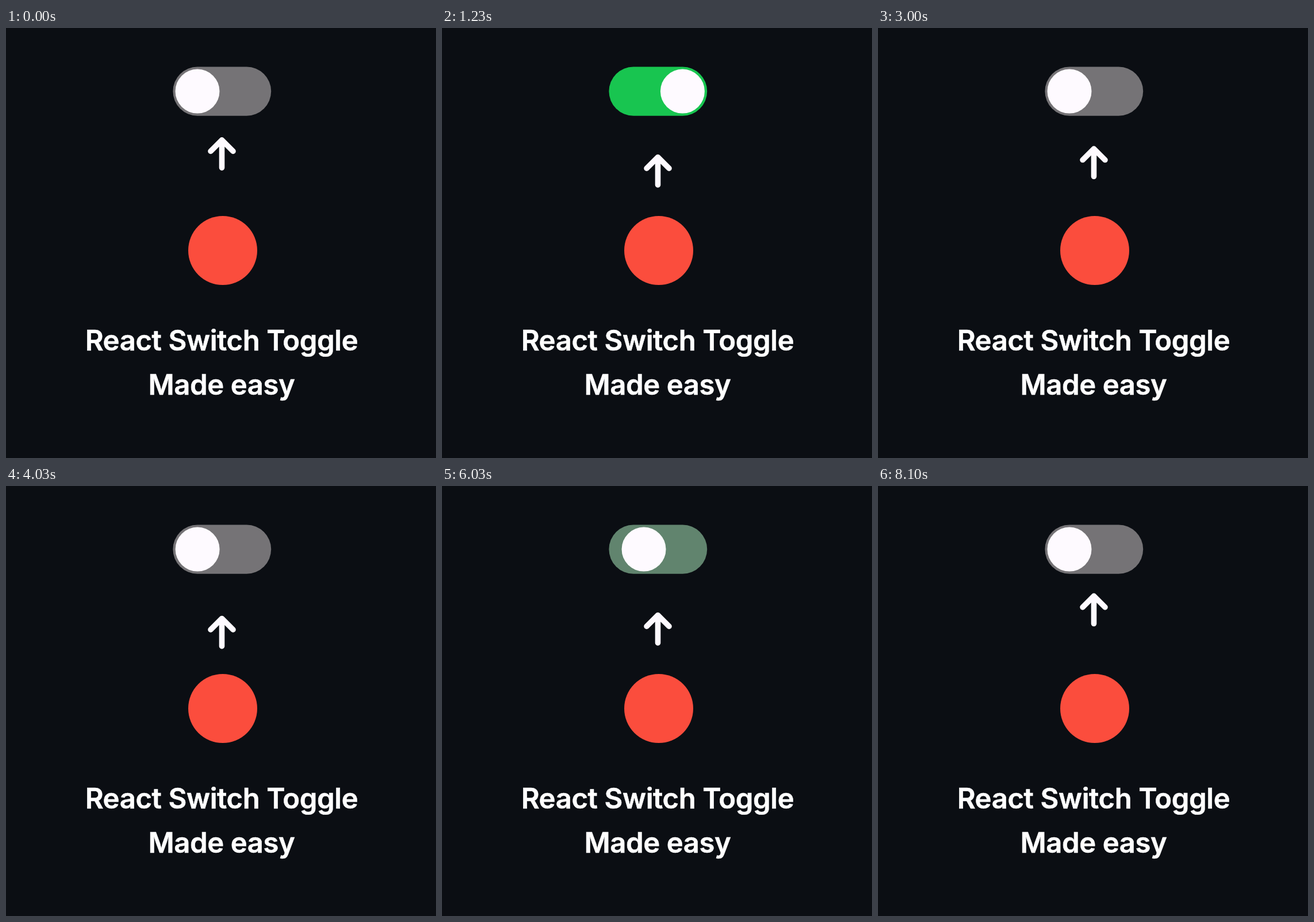
Write an HTML page that moves like this. It is 748 px wide and 748 px high and loops after 8120 ms.

```html
<!DOCTYPE html>
<html lang="en">
<head>
<meta charset="utf-8">
<title>Switch toggle</title>
<style>
  html, body { margin: 0; width: 100%; height: 100%; overflow: hidden; background: #0b0e13; }
  svg { display: block; width: 100vw; height: 100vh; }
  text {
    font: 600 49px Inter, "Open Sans", sans-serif;
    letter-spacing: -0.008em;
    fill: #fff;
    stroke: #fff;
    stroke-width: 0.6;
    text-anchor: middle;
  }
  #arrow { fill: none; stroke: #fefaff; stroke-width: 9.6; stroke-linecap: round; stroke-linejoin: round; }
</style>
</head>
<body>
<svg viewBox="0 0 748 748">
  <rect id="track" x="290.4" y="67.4" width="170.8" height="85.4" rx="42.7"/>
  <circle id="knob" cx="333" cy="110.1" r="38.5" fill="#fefaff"/>
  <path id="arrow" d="M375.5 53.2V5M356 24.5L375.5 5L395 24.5"/>
  <circle cx="377" cy="387" r="60" fill="#fb4d3d"/>
  <text x="375" y="561">React Switch Toggle</text>
  <text x="375" y="638">Made easy</text>
</svg>
<script>
  const LOOP = 8120;
  const BOUNCE = { period: 1600, topAt: 180, top: 185.5, height: 43 };
  const SLIDE = 300;
  const CLICKS = [900, 2150, 4030, 5885];
  const OFF = [117, 115, 118], ON = [24, 197, 80];

  const track = document.getElementById("track");
  const knob = document.getElementById("knob");
  const arrow = document.getElementById("arrow");

  // CSS-style cubic-bezier, solved by bisection
  function bezier(x1, y1, x2, y2) {
    const at = (a, b, s) => 3 * (1 - s) ** 2 * s * a + 3 * (1 - s) * s * s * b + s ** 3;
    return x => {
      if (x <= 0) return 0;
      if (x >= 1) return 1;
      let lo = 0, hi = 1;
      for (let i = 0; i < 24; i++) {
        const mid = (lo + hi) / 2;
        if (at(x1, x2, mid) < x) lo = mid; else hi = mid;
      }
      return at(y1, y2, lo);
    };
  }
  const ease = bezier(0.25, 0.1, 0.25, 1);
  const easeInOut = bezier(0.42, 0, 0.58, 1);

  function arrowTop(t) {
    const { period, topAt, top, height } = BOUNCE;
    const phase = ((t - topAt + period) % period) / period;
    return top + height * easeInOut(1 - Math.abs(1 - 2 * phase));
  }

  // 0 is off, 1 is on; clicks alternate between the two
  function switchState(t) {
    return CLICKS.reduce((v, at, i) => v + (i % 2 ? -1 : 1) * ease((t - at) / SLIDE), 0);
  }

  function draw(t) {
    const on = switchState(t);
    const rgb = OFF.map((c, i) => Math.round(c + (ON[i] - c) * on));
    track.setAttribute("fill", `rgb(${rgb})`);
    knob.setAttribute("cx", 333 + 85.4 * on);
    arrow.setAttribute("transform", `translate(0 ${arrowTop(t).toFixed(2)})`);
  }

  const start = performance.now();
  function tick() {
    draw((performance.now() - start) % LOOP);
    requestAnimationFrame(tick);
  }
  tick();
</script>
</body>
</html>
```
